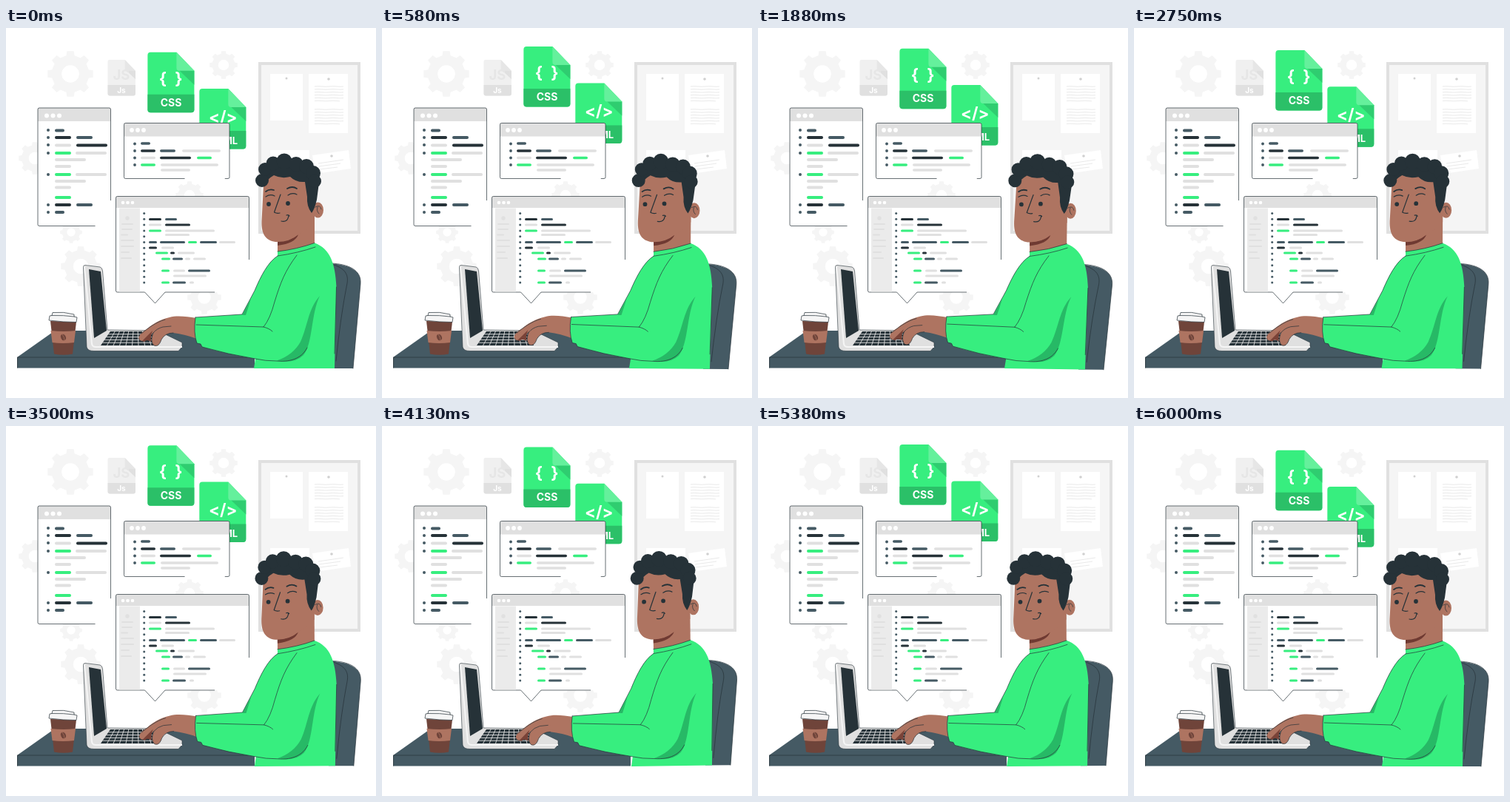
An HTML page that plays this animation: 500 by 500 pixels, repeating every 6040 ms.

```html
<!DOCTYPE html>
<html lang="en">
<head>
<meta charset="utf-8">
<title>Coder at work</title>
<style>
html, body { margin: 0; width: 100%; height: 100%; overflow: hidden; background: #fff; }
svg { display: block; width: 100vw; height: 100vh; }
text { font-family: Inter, "Open Sans", sans-serif; font-weight: 700; text-anchor: middle; fill: #fff; }
.line { fill: none; stroke: #263238; stroke-width: .7; stroke-linecap: round; stroke-linejoin: round; }
</style>
</head>
<body>
<svg viewBox="0 0 500 500">
  <g id="gears" fill="#f5f5f5"></g>

  <g id="board">
    <path d="M343 48H477V276H343Z" fill="#f5f5f5" stroke="#e0e0e0" stroke-width="4"/>
    <path d="M357 62H401V125H357ZM409 62H462V142H409ZM357 165H410V230H357ZM414 172L463 165 466 190 418 197Z" fill="#fff"/>
    <g fill="#d0d0d0"><circle cx="379" cy="68" r="1.5"/><circle cx="436" cy="69" r="1.8"/><circle cx="440" cy="173" r="1.8"/></g>
    <path id="notes" fill="none" stroke="#e0e0e0" stroke-width=".7"/>
  </g>

  <g id="files"></g>
  <g id="windows"></g>

  <g id="desk">
    <path d="M66 409H336V459.500H15V445Z" fill="#455a64"/>
    <path d="M15.500 459V445H336" class="line"/>
  </g>

  <g id="cup">
    <path d="M60 396L95 397 90 440.500Q78 443 65 440.500Z" fill="#6f443a"/>
    <path d="M60.500 409Q78 411 94 409L92 425Q77 427 62.500 425Z" fill="#ae7461"/>
    <ellipse cx="77.500" cy="418" rx="3.300" ry="4.300" transform="rotate(-25 77.500 418)" fill="#6f443a"/>
    <path d="M76 414Q79 418 79 422" fill="none" stroke="#ae7461" stroke-width=".7"/>
    <path d="M63 384.500Q78 383 92 387L92 390 96 391 95 397.500Q78 397.500 58 395L59 389 62 388.500Z" fill="#f5f5f5" stroke="#263238" stroke-width=".7"/>
    <path d="M62 388.500Q78 388 92 390" class="line"/>
  </g>

  <g id="laptop">
    <path d="M107 320.500L127 323Q130 324 130.500 328L137 408 205 409 238 425V431L233 436.500H119Q110 436.500 109 431L104.500 324Q104 320.500 107 320.500Z" fill="#e0e0e0" stroke="#263238" stroke-width=".6"/>
    <path d="M112 326L128 329 136 409 119 419Z" fill="#263238"/>
    <path d="M106 322L116 427Q117 431 121 431H238" fill="none" stroke="#f5f5f5" stroke-width="2"/>
    <path d="M141 410H197L205 429H128Z" fill="#263238"/>
    <path id="keys" fill="none" stroke="#e0e0e0" stroke-width=".9"/>
  </g>

  <g id="man">
    <path d="M435 318C461 319 481 326 479 346L469 460H435Z" fill="#455a64"/>
    <path d="M443 320C458 325 463 333 461 345Q452 390 446 450M440 318C461 319 481 326 479 346L469 460" class="line"/>

    <path d="M257 392C245 390 231 388 221 391C208 394 198 400 190 407C183 411 179 416 179.500 420C181 424 185 424 188 422L199 412C196 419 196 425 200 429C205 431 208 427 210 421Q215 412 226 412 Q242 414 258 420Z" fill="#ae7461"/>
    <path d="M179.500 420C181 424 185 424 188 422L199 412Q204 406 212 404L223 403M199 412C196 419 196 425 200 429C205 431 208 427 210 421Q215 412 226 412M183 413C190 407 203 397 215 394" class="line"/>
    <path d="M184 423L198 409Q195 416 196 424Q190 420 187 424Z" fill="#7a4338"/>

    <path d="M367 240H417V297Q394 311 367 307Z" fill="#ae7461"/>
    <path d="M367 288Q383 289 395 279Q391 291 367 294Z" fill="#6f3a32"/>

    <path d="M367 302Q393 299 417 290.500C438 298 445 318 446.500 350L444 460H335L337 447Q300 441 265 431L263 427 258 426Q253 412 256 391L319 387 336 355C344 336 354 316 367 308Z" fill="#37ee7f"/>
    <path d="M424 362C408 380 408 402 398 424Q388 442 366 449.500Q390 454 402 442C415 426 412 386 424 362ZM319 388L331 366 324 388Z" fill="#27b966"/>
    <path d="M367 308Q395 304 418 296M367 302Q393 299 417 290.500M367 308C354 316 344 336 336 355L319 387 256 391M393 307C377 328 371 344 363 370Q357 393 348 404L257 401M348 404Q356 406 360 410M256 391Q253 412 258 426L263 427 265 431Q300 441 337 447Q350 450 366 450C388 452 401 444 407 432M446.500 350L444 440" class="line"/>

    <path d="M349 193H407L417 235V262Q409 272 395 279Q382 290 364 289C351 287 345 279 345.500 261Z" fill="#ae7461"/>
    <ellipse cx="421.500" cy="246" rx="7.500" ry="10.500" fill="#ae7461"/>
    <path d="M418 242Q425 238 426 245M421 242Q419 247 423 251" class="line"/>
    <path d="M347 214Q340 190 376 176Q416 182 423 209L420 232Q417 245 413 250Q406 241 407 228L404 208Q392 209 384 201Q372 204 362 199Q353 204 347 214Z" fill="#263238"/>
    <g id="curls" fill="#263238"></g>
    <g fill="#263238"><circle cx="355" cy="238" r="2.900"/><circle cx="381" cy="237" r="2.900"/></g>
    <path d="M351 221Q356 217 362 219M380 217Q387 213 393 217" class="line" style="stroke-width:1.800"/>
    <path d="M351 228Q357 224 363 227M381 226Q387 222 393 225M371 225L362.500 249Q366 251 370 250M372 261Q381 263 382 253M379 253Q382 252 383 254" class="line" style="stroke-width:1.200"/>
  </g>
</svg>

<script>
const $ = id => document.getElementById(id);
const GREEN = '#37ee7f';
const COLORS = { d: '#263238', s: '#455a64', e: '#e0e0e0', g: GREEN };

const circles = (list, fill = '') =>
  list.map(([x, y, r]) => `<circle cx="${x}" cy="${y}" r="${r}" ${fill && `fill="${fill}"`}/>`).join('');

// Gear: a ring with eight blunt teeth
function gear([x, y, r]) {
  let d = '';
  for (let i = 0; i < 8; i++)
    for (const [turn, k] of [[-.22, .82], [-.15, 1], [.15, 1], [.22, .82]]) {
      const a = i * Math.PI / 4 + turn;
      d += `${d ? 'L' : 'M'}${x + r * k * Math.cos(a)} ${y + r * k * Math.sin(a)}`;
    }
  const h = r * .38;
  return `<path fill-rule="evenodd" d="${d}ZM${x - h} ${y}a${h} ${h} 0 1 0 ${2 * h} 0a${h} ${h} 0 1 0 ${-2 * h} 0"/>`;
}
$('gears').innerHTML = [[87, 62, 31], [294, 50, 19], [39, 176, 22], [248, 226, 19],
  [88, 276, 15], [101, 322, 27], [268, 364, 23]].map(gear).join('');

// Pages on the board
let notes = '';
for (const top of [79, 110])
  for (let i = 0; i < 6; i++)
    notes += `M417 ${top + i * 3.9}q5 -.500 10 0t10 0t10 0t${i == 5 ? 4 : 9} 0`;
for (let i = 0; i < 3; i++) notes += `M${422 + i} ${183 + i * 4}l${34 - i * 5} ${-5 + i}`;
$('notes').setAttribute('d', notes);

// Document icon with a folded corner and a name band
function file(id, x, y, scale, body, band, fold, shade, art) {
  return `<g id="${id}"><g transform="translate(${x} ${y}) scale(${scale})">
    <path d="M4 0H39L63 25V77.500Q63 81.500 59 81.500H4Q0 81.500 0 77.500V4Q0 0 4 0Z" fill="${body}"/>
    <path d="M41 23L63 44V25Z" fill="${shade}"/>
    <path d="M39 0L63 25H43Q39 25 39 21Z" fill="${fold}"/>
    <path d="M0 57H63V77.500Q63 81.500 59 81.500H4Q0 81.500 0 77.500Z" fill="${band}"/>${art}</g></g>`;
}
const label = (s, x, y, size, extra = '') => `<text x="${x}" y="${y}" font-size="${size}" ${extra}>${s}</text>`;
const green = [GREEN, '#2bc068', '#65f09c', '#2fcd70'];
$('files').innerHTML =
  file('js', 137.5, 43, .595, '#f0f0f0', '#e0e0e0', '#e6e6e6', '#e0e0e0',
    label('JS', 31, 46, 31, 'style="fill:#e6e6e6"') + label('Js', 31, 76, 17)) +
  file('html', 261.3, 82.4, 1, ...green, label('&lt;/&gt;', 32, 46, 22) + label('HTML', 33, 75, 13)) +
  file('css', 191.4, 33.1, 1, ...green, label('{', 20.5, 43, 22) + label('}', 42, 43, 22) + label('CSS', 31.7, 72.7, 14));

// Each row: y, then from-to plus a colour letter
const bars = (rows, h) => rows.map(row => {
  const [y, ...parts] = row.split(' ');
  return parts.map(p => {
    const [a, b] = p.slice(0, -1).split('-');
    return `<rect x="${a}" y="${y - h / 2}" width="${b - a}" height="${h}" rx="${h / 2}" fill="${COLORS[p.slice(-1)]}"/>`;
  }).join('');
}).join('');

// The outline runs clockwise from the top left and breaks off near the lower right
function pane(x, y, w, h, head, dots, dash, tip = '') {
  const d = `M${x + 2} ${y}h${w - 4}q2 0 2 2v${h - 4}q0 2 -2 2${tip}H${x + 2}q-2 0 -2 -2v${4 - h}q0 -2 2 -2Z`;
  return `<path d="${d}" fill="#fff"/><path d="M${x} ${y + head}V${y + 2}q0 -2 2 -2h${w - 4}q2 0 2 2v${head - 2}Z" fill="#e0e0e0"/>
    ${circles(dots, '#fff')}<path d="${d}" class="line" stroke-dasharray="${dash} 999"/>`;
}
const bullets = (x, ys, r) => circles(ys.map(y => [x, y, r]), COLORS.s);

$('windows').innerHTML =
  pane(43, 108, 98.5, 159.5, 18, [55, 63.5, 72].map(x => [x, 118.5, 3]), '220 55') +
  bullets(57, [138, 148, 158, 169, 198, 239, 249], 2) +
  bars(['138.5 66-79s', '148 66-88d 95-117s', '158.5 66-88e 95-137d', '169 66-88g 94-136e',
    '178 66-108e', '187 66-88e', '198 66-88g 94-136e', '207 66-108e', '215.500 66-88e',
    '229 66-88g', '239 66-88d 95-117s', '249 66-79s'], 3.8) +

  pane(159.5, 128.5, 142.5, 75, 18, [170, 178, 186].map(x => [x, 138, 2.9]), '219 55') +
  bullets(174, [156.5, 166, 175.5, 185], 1.9) +
  bars(['156 182-195s', '166 182-202d 208-229s 238-290e', '175.500 182-202e 208-250d 258-278g',
    '185 182-202g 209-287e', '192 209-249e'], 3.5) +

  pane(148.5, 227.5, 180, 129.5, 15.5, [158, 164.5, 171].map(x => [x, 236, 2.3]), '262 90', 'H215L201.500 372 187.500 357') +
  '<path d="M153 243.500H181V356.500H153Z" fill="#ebebeb"/>' + circles([[164, 257, 2.7]], COLORS.e) +
  bars(['265 156-172e', '272 156-171e', '279.500 155-165e', '287 155-173e', '295 155-173e', '303 155-167e', '311 155-170e'], 2) +
  bullets(186.7, Array.from({ length: 13 }, (_, i) => 250.5 + i * 7.8), 1.5) +
  bars(['258.500 193-210d 215-231s', '266 193-210e 215-249d', '274 193-210g 215-282e', '279.500 215-248e',
    '289.500 193-204s 208-242s 246-258g 262-285s 288-310e', '297 193-204d 210-227e',
    '304 202-219g 222-228d 232-255e', '312 210-222g 225-239s 242-249e 253-270e',
    '328 210-221g 226-242e 246-276s', '335 226-271e', '344 210-221g 225-243s 248-254e'], 3);

// Keyboard grid
let keys = '';
for (let i = 1; i < 5; i++) keys += `M${141 - i * 2.6} ${410 + i * 3.8}H${197 + i * 1.6}`;
for (let i = 1; i < 9; i++) keys += `M${141 + i * 6.2} 410L${128 + i * 8.5} 429`;
$('keys').setAttribute('d', keys);

$('curls').innerHTML = circles([[346, 206, 9], [350, 191, 9], [361, 183, 9.5], [376, 180, 10.5],
  [392, 184, 10], [406, 187, 10], [415, 196, 10], [417, 207, 9]]);

const LOOP = 6040, FLOAT = 1500, SWAY = 6000;
// Triangle wave: 0 at the start, 1 half way
const rise = p => 1 - Math.abs(1 - 2 * (p % 1));

function draw(now) {
  const t = now % LOOP;
  const lift = -10 * rise((t + 20) / FLOAT);
  for (const id of ['css', 'html']) $(id).setAttribute('transform', `translate(0 ${lift})`);
  const angle = 2 * rise(t / SWAY + .25) - 1;
  $('man').setAttribute('transform', `rotate(${angle} 328 308)`);
}
const start = performance.now();
(function tick() {
  draw(performance.now() - start);
  requestAnimationFrame(tick);
})();
</script>
</body>
</html>
```
